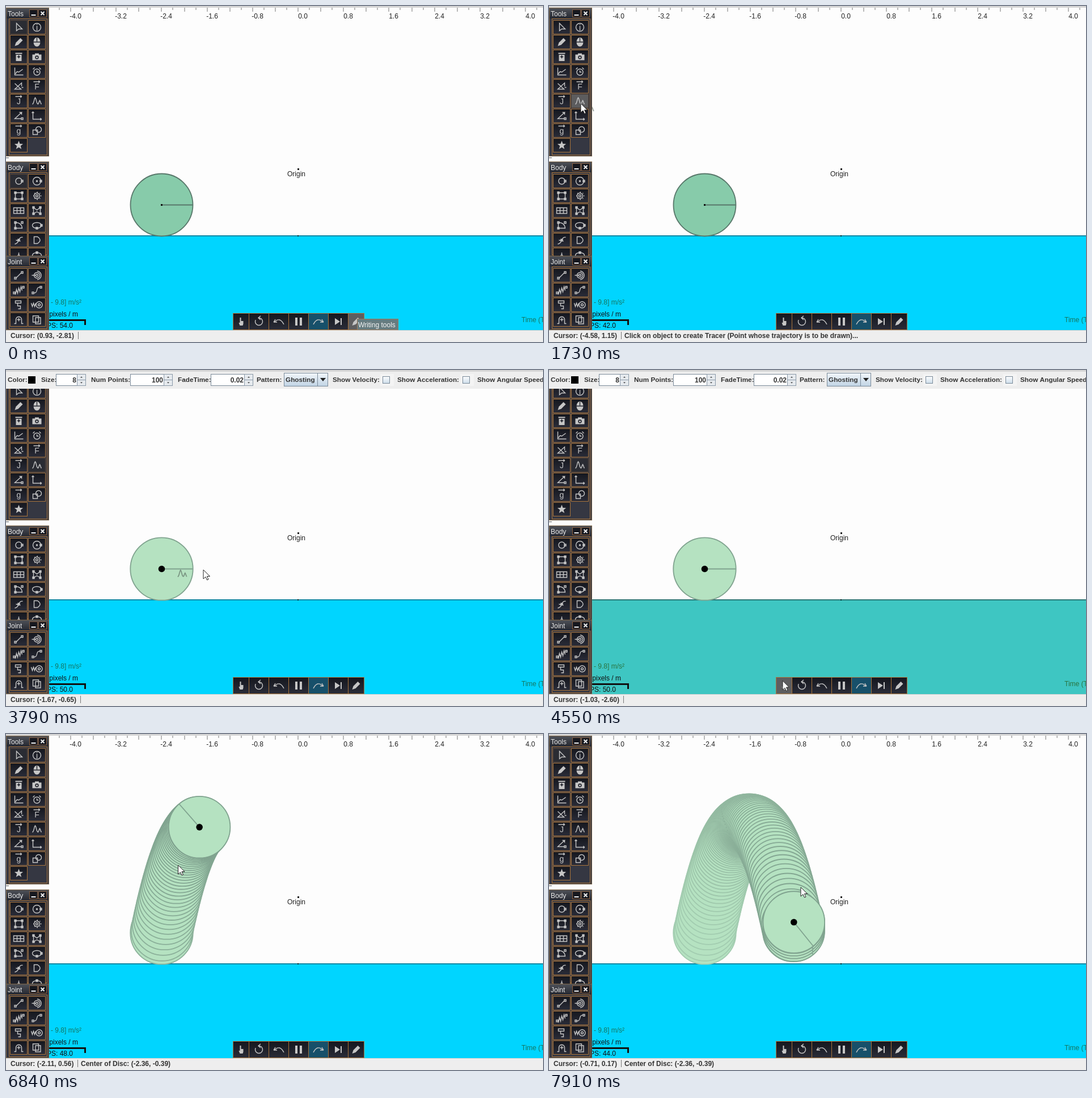
An HTML page with a canvas that plays this animation: 947x592 px, repeating every 8000 ms.

```html
<!DOCTYPE html>
<html lang="en">
<head>
<meta charset="utf-8">
<title>Disc tracer</title>
<style>
html, body { margin: 0; width: 100%; height: 100%; overflow: hidden; background: #fdfdfd; }
canvas { display: block; }
</style>
</head>
<body>
<canvas id="stage" width="947" height="592"></canvas>
<script>
const g = document.getElementById('stage').getContext('2d');
const LOOP = 8000, STEP = 108.3, PX = 100.25, OX = 515, OY = 287;
const SANS = '"Liberation Sans", Arial, sans-serif';
const EDGE = '#a8743c';

// Story: choose the tracer, attach it, choose the hand, throw the disc
const PICK = 1500, BAR = 1900, ATTACH = 3500, HAND = 4700, THROW = 6089;

// Pointer moves: start, end, x, y
const moves = [
  [0, 1500, 56, 171.7], [1830, 2260, 274, 350], [3666, 3790, 348, 352], [3800, 4500, 412, 547.5],
  [4990, 5350, 294.5, 341], [6100, 6800, 303.5, 231], [6830, 7900, 444, 270]
];
const clamp = v => Math.max(0, Math.min(1, v));
function pointer(t) {
  let x = 608, y = 569;
  for (const [from, to, tx, ty] of moves) {
    const k = 1 - (1 - clamp((t - from) / (to - from))) ** 2.5;
    x += (tx - x) * k;
    y += (ty - y) * k;
  }
  return [x, y];
}

// Icon parts, centred on 0,0; a leading "!" means filled
const plot = (n, f, end = '') => 'M' + Array.from({ length: n }, (_, i) => f(i)).join('L') + end;
const polar = (r, a) => [r * Math.cos(a), r * Math.sin(a)];
const oval = (rx, ry, x = 0, y = 0) =>
  `M${x - rx} ${y}a${rx} ${ry} 0 1 0 ${2 * rx} 0a${rx} ${ry} 0 1 0 ${-2 * rx} 0`;
const ring = (r, x, y) => oval(r, r, x, y);
const box = (w, h, x = 0, y = 0) => `M${x - w / 2} ${y - h / 2}h${w}v${h}h${-w}z`;
const knob = (x, y) => box(3, 3, x, y);
const ends = (x, y) => knob(-x, y) + knob(x, -y);
const star = (n, r, q) => plot(2 * n, i => polar(i % 2 ? q : r, i * Math.PI / n - Math.PI / 2), 'Z');
const spiral = (r, a, b) => plot(16, i => polar(r, a + (b - a) * i / 15));
const bump = (x, mid, w) => Math.exp(-(((x - mid) / w) ** 2));

const tracer = plot(17, i => [i - 8, 6 - 12 * bump(i, 5, 2.6) - 7 * bump(i, 13, 1.8)]);
const spring = plot(7, i => [2 * i - 6, 4 - i * 1.2 + (i % 2 ? -4 : 4)]);
const spokes = plot(8, i => polar(6.5, i * Math.PI / 4)).replace(/L/g, 'M').replace(/M([^M]+)/g, 'M$1l1.5 0');
const axes = 'M-7-7V6H8', vector = 'M-6-8H5M3-10L5-8L3-6', pen = '!M-7 7L-5 1L3-7L7-3L-1 5Z';
const corners = ends(6, 5.5) + ends(6, -5.5);

const toolIcons = [
  'M-4-7V6L0 3H6Z', [ring(7), 'i'], pen,
  '!' + oval(6, 8) + box(12, 1.3) + box(1.3, 7, 0, -4),
  '!' + box(12, 2, 0, -6) + box(10, 11, 0, 2) + star(4, 3.5, 1.5),
  '!' + box(16, 10, 0, 1) + box(7, 2, 0, -5) + ring(3.2, 0, 1) + ring(1.6, 0, 1),
  axes + 'M-6 4L-3 0L0 1L7-4', ring(5.5, 0, 1) + 'M0-2V1H3M-7-4L-4-7M7-4L4-7',
  'M-7-5L4 5H-7L5-6V0M5 2H8', [vector, 'F'], [vector, 'J'], tracer,
  'M4 5H-7L5-6H1M5-6V-2' + knob(6, 5), axes + 'M-9-5L-7-7L-5-5M6 4L8 6L6 8',
  [vector, 'g'], box(8, 8, -3, 3) + ring(5, 3, -2), '!' + star(5, 8, 3.4)
];
const bodyIcons = [
  ring(5.5) + knob(6, 0), ring(7) + ring(1) + knob(7, 0), box(12, 11) + corners,
  ring(5) + ring(2) + spokes, box(18, 10) + box(6, 10) + 'M-9 0H9',
  'M-6-5.5L0-1L6-5.5V5.5L0 2L-6 5.5Z' + corners, 'M-6-5V5H6Q5-5-6-5' + ends(6, 5) + knob(-6, -5),
  oval(8, 5) + knob(8, 0) + knob(0, 5), 'M-7 7Q-2 6 0 0T7-5M-5 0L3 2' + knob(0, 0),
  'M-5-6V6H1Q10 0 1-6Z', 'M0-4V0M-4 6L0-1L4 6', oval(8, 5, 0, 1) + knob(0, -4)
];
const jointIcons = [
  'M-5 5L5-5' + ends(6, 5), ring(5) + ring(2) + 'M-9 0H-2' + spiral(7.5, -1.5, 1.5),
  spring + ends(8, 5), 'M-6 5Q-1 6 0 0T6-5' + ends(7, 5),
  box(10, 4, -1, -5) + 'M-2-3V2H3V7H-1', plot(5, i => [2 * i - 10, i % 2 ? 3 : -3]) + ring(5.5, 4, 0) + ring(2, 4, 0),
  spiral(5, -Math.PI, 0) + 'M-5 0V7H-8M5 0V7H8M0-3V3M-3 0H3', box(10, 11, -2, -1) + box(9, 11, 2, 2)
];
const playIcons = [
  '!M-2 7L-4 2H-2V-7H0V-1H4V4L3 7Z', spiral(6.5, -1.6, 3.6) + 'M3-10L-1-6.5L3-3',
  'M-9 1L-6-4M-9 1L-3 1M-8 1Q2-9 9 5', '!' + box(4, 14, -4) + box(4, 14, 4),
  'M9 1L6-4M9 1H3M8 1Q-2-9-9 5', '!M-6-6L3 0L-6 6Z' + box(2, 12, 5), pen
];
const arrow = new Path2D('M0 0V16L4 12.5L6.5 18L9 17L6.5 11.5H11.5Z');

function rect(x, y, w, h, fill, line) {
  g.fillStyle = fill;
  g.fillRect(x, y, w, h);
  if (line) {
    g.strokeStyle = line;
    g.lineWidth = 1;
    g.strokeRect(x + .5, y + .5, w - 1, h - 1);
  }
}
function shade(y, h, a, b) {
  const s = g.createLinearGradient(0, y, 0, y + h);
  s.addColorStop(0, a);
  s.addColorStop(1, b);
  return s;
}
function text(s, x, y, color = '#222', align = 'left', font = '12px') {
  g.font = `${font} ${SANS}`;
  g.textAlign = align;
  g.fillStyle = color;
  g.fillText(s, x, y);
}
const bold = (s, x, y, align, size = 12) => text(s, x, y, '#333', align, `bold ${size}px`);
const label = (s, x) => bold(s, x, 21, 'left', 11.75);

function icon(shape, x, y, color = '#c6c6c6', width = 1.4) {
  const [d, letter] = [].concat(shape);
  const fill = d[0] === '!', p = new Path2D(fill ? d.slice(1) : d);
  g.save();
  g.translate(x, y);
  g.fillStyle = g.strokeStyle = color;
  g.lineWidth = width;
  if (fill) g.fill(p, 'evenodd'); else g.stroke(p);
  if (letter) text(letter, 0, 5, color, 'center', '14px');
  g.restore();
}
function button(x, y, w, h, shape, bg, edge = EDGE) {
  rect(x, y, w, h, bg || shade(y, h, '#14161d', '#2b2d39'), edge);
  icon(shape, x + w / 2, y + h / 2);
}

function panel(title, y, h, icons, lit, active) {
  g.save();
  g.beginPath();
  g.rect(0, y, 76, h);
  g.clip();
  rect(0, y, 76, h, '#353742', '#7d6547');
  rect(1, y + 1, 74, 18, shade(y, 18, '#50535a', '#272a33'));
  text(title, 3, y + 15, '#e8e8e8');
  ['M-4 3H4', 'M-3-3L3 3M3-3L-3 3'].forEach((d, i) => {
    rect(41 + 16 * i, y + 3, 15, 14, '#16181f', '#8a6040');
    icon(d, 48.5 + 16 * i, y + 10, '#f0f0f0', 2);
  });
  rect(5, y + 19, 68, h - 21, '#353742', EDGE);
  icons.forEach((d, i) => {
    const by = Math.round(y + 21.5 + 26.1 * (i >> 1)), on = i === active;
    button(7 + 32 * (i % 2), by, 31, 25, d, i === lit ? '#5c5c5e' : on ? '#2a2c33' : '', on ? '#5a4636' : EDGE);
  });
  g.restore();
}

function ruler() {
  for (let i = -22; i <= 22; i++) {
    const x = Math.round(OX + i * PX / 5) - .5;
    rect(x, 3, 1, i % 2 ? 4 : 7, '#777');
    if (i % 4 === 0) text((i / 5).toFixed(1), x + 9, 21.5, '#222', 'center');
  }
}

function spinner(x, w, value) {
  rect(x, 7, w, 21, '#fff', '#7a8a99');
  [-1, 1].forEach(side => {
    rect(x + w - 16, 12 + 5 * side, 16, 11, '#e6eaee', '#8a99a8');
    icon(`!M-2 ${-side}H2L0 ${side}Z`, x + w - 8, 17.5 + 5 * side, '#333');
  });
  bold(value, x + w - 17, 21.5, 'right');
}
function properties() {
  rect(0, 3, 947, 30, '#eee');
  label('Color:', 3);
  rect(39, 11, 13, 13, '#000');
  label('Size:', 62);
  spinner(88, 53, '8');
  label('Num Points:', 150);
  spinner(219, 75, '100');
  label('FadeTime:', 303);
  spinner(361, 75, '0.02');
  label('Pattern:', 442);
  rect(490, 5, 78, 24, shade(5, 24, '#f3f7fa', '#bfd3e4'), '#7a8a99');
  rect(549, 5, 1, 24, '#7a8a99');
  label('Ghosting', 493);
  icon('!M-5-3H5L0 3Z', 559, 17, '#222');
  label('Show Velocity:', 576);
  label('Show Acceleration:', 690);
  label('Show Angular Speed:', 831);
  [664, 805].forEach(x => {
    rect(x - 4, 7, 24, 21, '#f4f4f4');
    rect(x, 11, 13, 13, shade(11, 13, '#fff', '#cbdcea'), '#7a8a99');
  });
}

function ball(x, y, a, r, fill, line) {
  g.beginPath();
  g.arc(x, y, r, 0, 7);
  g.fillStyle = fill;
  g.fill();
  g.moveTo(x, y);
  g.lineTo(x + r * Math.cos(a), y + r * Math.sin(a));
  g.strokeStyle = line;
  g.lineWidth = 1.8;
  g.stroke();
}
// Throw, landing and rebound, with s in simulated seconds
const RISE = .623;
function pose(s) {
  const air = Math.min(s, 2 * RISE), up = s - air;
  const y = up ? 350 - 320 * up + 490 * up * up : 159.8 + 490 * (air - RISE) ** 2;
  return [274.2 + 126.5 * air, y, -248 * air * Math.PI / 180];
}
function traced(t) {
  const now = Math.max(0, (t - THROW) * .721e-3);
  const tint = s => {
    const k = .65 * clamp((now - s) / 1.2) ** 1.3;
    return `rgb(${128 + 53 * k}, ${163 + 63 * k}, ${143 + 50 * k})`;
  };
  ball(274.5, 350.5, 0, 55.2, '#b5e2c1', tint(0));
  for (let s = .45 / 60; s < now; s += 1 / 60) ball(...pose(s), 54.3, '#b5e2c1', tint(s));
  if (now) ball(...pose(now), 54.3, '#b5e2c1', tint(now));
  const [x, y] = now ? pose(now) : [274.5, 350.5];
  g.beginPath();
  g.arc(x, y, 5.8, 0, 7);
  g.fillStyle = '#000';
  g.fill();
}

function playbar(t) {
  playIcons.forEach((d, i) => {
    const x = i ? 393 + 35 * i : 400;
    const hover = i === 6 && t < STEP || i === 0 && t > 4500 && t < 5050;
    button(x, 541, i % 6 ? 36 : 29, 30, d, hover ? '#5e5e60' : i === 4 ? '#17506a' : '');
  });
  if (t > HAND && t < 5840) {
    g.setLineDash([1, 1]);
    g.strokeStyle = '#ddd';
    g.strokeRect(403.5, 543.5, 22, 24);
    g.setLineDash([]);
  }
  if (t < STEP) {
    rect(619, 551, 73, 20, '#667c80', '#9a7a5c');
    text('Writing tools', 621, 565.5, '#f4f4f4');
  }
}

function message(t) {
  if (t > THROW) return 'Center of Disc: (-2.36, -0.39)';
  if (t > HAND) return 'Drag to move world, use wheel to Zoom in/out,...';
  return t > PICK && t < ATTACH ? 'Click on object to create Tracer (Point whose trajectory is to be drawn)...' : '';
}
function status(t, x, y) {
  rect(0, 571, 947, 21, '#eee');
  rect(0, 571, 947, 1, '#d0d0d0');
  const s = `Cursor: (${((x - OX) / PX).toFixed(2)}, ${((OY - y) / PX).toFixed(2)})`;
  bold(s, 8, 585);
  const end = Math.round(8 + g.measureText(s).width + 7);
  rect(end, 574, 1, 13, '#777');
  bold(message(t), end + 6, 585);
}

function world(t) {
  const teal = t > 4300 && t < HAND, dim = teal ? '#2a7440' : '#157560';
  const fps = [54, 42, 47, 50, 49, 48, 44][Math.floor(t / 1150)];
  rect(0, 405, 947, 167, teal ? '#3ec6c2' : '#00d5ff');
  rect(0, 404, 947, 2, teal ? '#2b7876' : '#0a89a5');
  if (t < ATTACH) {
    ball(274.5, 350.5, 0, 55, '#87cbaa', '#58776a');
    rect(273, 349, 3, 3, '#111');
  } else traced(t);

  rect(514, 286, 3, 3, '#222');
  text('Origin', 512, 299.5, '#222', 'center');
  rect(514, 404, 2, 2, '#022');
  text('[0, - 9.8] m/s²', 133, 525.5, dim, 'right');
  text('100 pixels / m', 127, 546.5, '#111', 'right');
  text(`FPS: ${fps}.0`, 118, 566.5, '#111', 'right');
  rect(60, 552, 81, 3, '#111');
  rect(138, 552, 3, 10, '#111');
  text('Time (T', 909, 556.5, dim);
}

function render(t) {
  const [x, y] = pointer(t), toolOn = t > PICK && t < HAND, barOn = t > BAR && t < HAND;
  rect(0, 0, 947, 592, '#fdfdfd');
  if (!barOn) ruler();
  rect(0, 267, 5, 1, '#555');
  world(t);

  // The tool badge trails the pointer by one refresh
  if (t > PICK && t < 4300) {
    const [bx, by] = pointer(t - STEP);
    icon(tracer, bx + 15, by + 8, 'rgba(85,100,90,.65)', 1.6);
  }
  panel('Tools', 3, 262, toolIcons, t > 1400 && t < BAR ? 11 : -1, toolOn ? 11 : 0);
  panel('Body', 274, 167, bodyIcons, -1, t < PICK ? 0 : -1);
  panel('Joint', 440, 131, jointIcons);
  playbar(t);
  rect(0, 0, 947, 3, '#d6d6d6');
  if (barOn) properties();
  status(t, x, y);

  if (t < STEP) return;
  g.save();
  g.translate(x, y);
  g.fillStyle = '#fff';
  g.fill(arrow);
  g.strokeStyle = '#222';
  g.lineWidth = 1;
  g.stroke(arrow);
  g.restore();
}

let shown = -1;
const start = performance.now();
function loop() {
  const t = (performance.now() - start) % LOOP;
  const held = Math.floor((t + 6) / STEP) * STEP;
  if (held !== shown) render(shown = held);
  requestAnimationFrame(loop);
}
loop();
</script>
</body>
</html>
```
